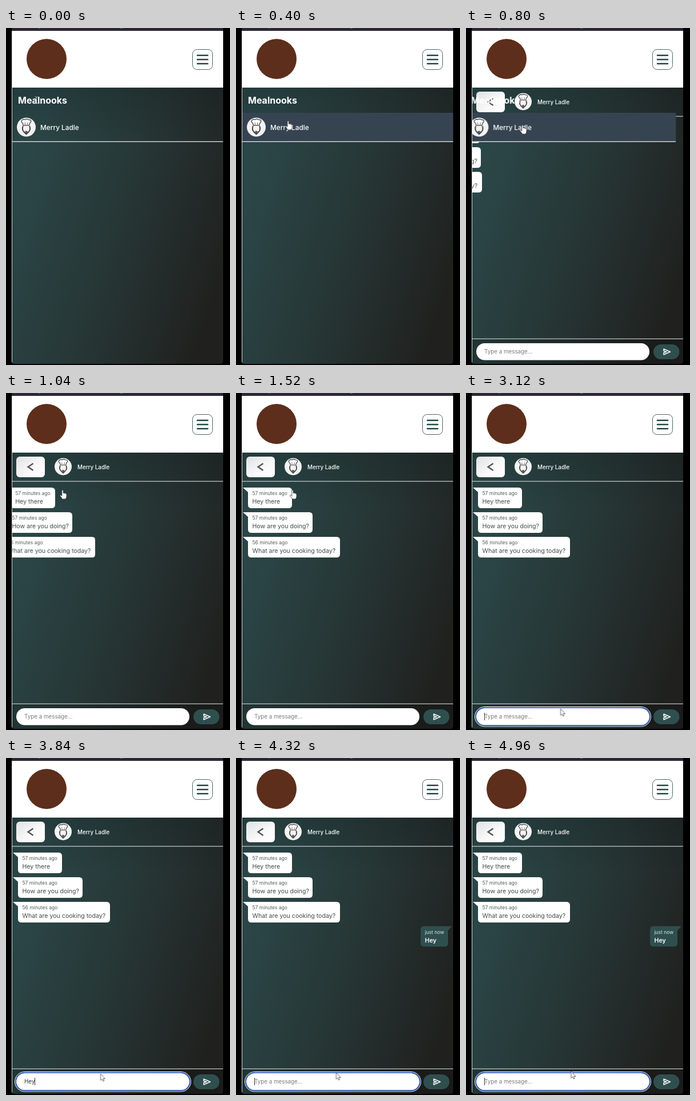
Animation of 392x588 px, one loop 5040 ms. Source, as an HTML page:

```html
<!DOCTYPE html>
<html lang="en">
<head>
<meta charset="utf-8">
<title>Chat</title>
<style>
  html, body { margin: 0; width: 100%; height: 100%; overflow: hidden; background: #000; }
  svg { display: block; width: 392px; height: 588px; font-family: Inter, "Open Sans", sans-serif; }

  .anim, .on, .bubble, .mine { animation: 5040ms linear infinite; }
  .on, .step { animation-timing-function: step-end; }

  .title { font: 700 16px Inter, sans-serif; fill: #fff; }
  .name { font-weight: 500; fill: #fff; }
  .time { font-size: 8.5px; fill: #565b5b; }
  .text { font-size: 10.6px; fill: #424a4a; }
  .field { font-size: 9.8px; }
  .bubble { animation-name: enter; fill: #fff; }
  .mine { animation-name: reply; fill: #2f4f4f; }

  .list { animation-name: leave; }
  .hover { animation-name: hover; }
  .chat { animation-name: open; }
  .ring { animation-name: focus; }
  .hint { animation-name: hint; }
  .k1 { animation-name: key1; }
  .k2 { animation-name: key2; }
  .k3 { animation-name: key3; }
  .caret { animation-name: caret; }
  .blink { animation-name: blink; }
  .old { animation-name: old; }
  .new { animation-name: new; }
  .pointer { animation-name: move; }
  .beam { animation-name: beam; }
  .arrow { animation-name: arrow; }
  .hand { animation-name: hand; }

  @keyframes leave {
    0%, 15.65% { transform: none; animation-timing-function: ease; }
    20.4%, 100% { transform: translateX(-372px); }
  }
  @keyframes enter {
    0%, 15.3% { transform: translateX(calc(var(--w) * -1px)); animation-timing-function: ease; }
    25.2%, 100% { transform: none; }
  }
  @keyframes reply {
    0%, 77.5% { transform: translateX(60px); animation-timing-function: ease; }
    87.4%, 100% { transform: none; }
  }
  @keyframes hover { 0% { opacity: 0; } 7.9%, 100% { opacity: 1; } }
  @keyframes open { 0% { opacity: 0; } 15.3%, 100% { opacity: 1; } }
  @keyframes focus { 0% { opacity: 0; } 61.9%, 100% { opacity: 1; } }
  @keyframes hint { 0% { opacity: 1; } 69.8% { opacity: 0; } 77.5%, 100% { opacity: 1; } }
  @keyframes key1 { 0% { opacity: 0; } 69.8% { opacity: 1; } 77.5%, 100% { opacity: 0; } }
  @keyframes key2 { 0% { opacity: 0; } 71.4% { opacity: 1; } 77.5%, 100% { opacity: 0; } }
  @keyframes key3 { 0% { opacity: 0; } 74.6% { opacity: 1; } 77.5%, 100% { opacity: 0; } }
  @keyframes caret {
    0% { transform: none; }
    69.8% { transform: translateX(7.3px); }
    71.4% { transform: translateX(13px); }
    74.6% { transform: translateX(18px); }
    77.5%, 100% { transform: none; }
  }
  @keyframes blink {
    0% { opacity: 0; }
    61.9% { opacity: 1; }
    87.4% { opacity: 0; }
    97.4%, 100% { opacity: 1; }
  }
  @keyframes old { 0% { opacity: 1; } 77.5%, 100% { opacity: 0; } }
  @keyframes new { 0% { opacity: 0; } 77.5%, 100% { opacity: 1; } }
  @keyframes move {
    0%, 1.6% { transform: translate(53px, 126px); animation-timing-function: ease-in-out; }
    10.5%, 33.4% { transform: translate(99px, 169px); animation-timing-function: ease-in-out; }
    44.4%, 47.7% { transform: translate(66px, 177px); animation-timing-function: ease-in-out; }
    59%, 78% { transform: translate(165.5px, 551px); animation-timing-function: ease-in-out; }
    93%, 100% { transform: translate(184px, 547px); }
  }
  @keyframes beam { 0% { opacity: 1; } 4.7%, 100% { opacity: 0; } }
  @keyframes arrow {
    0% { opacity: 0; }
    4.7% { opacity: 1; }
    7.9% { opacity: 0; }
    34.9%, 100% { opacity: 1; }
  }
  @keyframes hand { 0% { opacity: 0; } 7.9% { opacity: 1; } 34.9%, 100% { opacity: 0; } }
</style>
</head>
<body>
<svg viewBox="0 0 392 588">
  <defs>
    <linearGradient id="teal" gradientUnits="userSpaceOnUse" x1="30" y1="260" x2="392" y2="375">
      <stop offset="0" stop-color="#2b4647"/>
      <stop offset=".5" stop-color="#263635"/>
      <stop offset="1" stop-color="#20211f"/>
    </linearGradient>
    <linearGradient id="shade" x2="0" y2="1">
      <stop offset="0" stop-opacity=".16"/>
      <stop offset="1" stop-opacity="0"/>
    </linearGradient>
    <linearGradient id="shine" x2="1" y2="1">
      <stop offset="0" stop-color="#dfe1e3"/>
      <stop offset=".6" stop-color="#fafafa"/>
      <stop offset="1" stop-color="#fff"/>
    </linearGradient>
    <clipPath id="screen"><path d="M10 5H380V581Q380 586 375 586H15Q10 586 10 581Z"/></clipPath>
    <clipPath id="inner"><rect x="11" y="104" width="369" height="482"/></clipPath>
    <symbol id="chef" viewBox="-16 -16 32 32" overflow="visible">
      <circle r="16" fill="#f3f3f3"/>
      <g fill="none" stroke="#3a3a3a" stroke-width="1.2" stroke-linejoin="round">
        <path d="M-5-3L-6-7Q-10-9-7-12Q-4-14-2-12.500Q1-15 4-12.500Q8-13 8-10Q8-8 6-7L5-3Z" fill="#fff"/>
        <path d="M-2-4L-2.500-8M2-4L2.500-8" stroke-width=".8"/>
        <path d="M-5.500-2Q-8 4-4 8L0 12L4 8Q8 4 5.500-2" stroke-width="1.800"/>
      </g>
      <path d="M-2.500 7Q0 5.500 2.500 7L0 12Z" fill="#555"/>
    </symbol>
  </defs>

  <rect x="10" width="370" height="5" fill="#2b2833"/>
  <path d="M57 0l3-.2M200 0h4" stroke="#aaa"/>

  <g clip-path="url(#screen)">
    <rect x="10" y="5" width="370" height="581" fill="url(#teal)"/>
    <rect x="10" y="104" width="370" height="96" fill="url(#shade)"/>
    <rect x="10" y="5" width="370" height="99" fill="#fff"/>
    <circle cx="71" cy="54" r="35" fill="#5c2e1b"/>
    <rect x="326.500" y="37.500" width="35" height="35" rx="8" fill="#fff" stroke="#4a6661"/>
    <path d="M335 47.800H353M335 55H353M335 62.200H353" stroke="#234a44" stroke-width="2.600" stroke-linecap="round"/>

    <g clip-path="url(#inner)">
      <g class="chat on">
        <rect x="11" y="153.500" width="369" height="1.200" fill="#c8d0d0"/>
        <rect x="18" y="111" width="50" height="36" rx="6" fill="url(#shine)"/>
        <path d="M47.500 123L38.500 129L47.500 135" fill="none" stroke="#505050" stroke-width="2.300"/>
        <use href="#chef" x="85" y="113.500" width="30" height="30"/>
        <text class="name" x="125" y="132.500" font-size="9.800">Merry Ladle</text>

        <g class="bubble" style="--w:77">
          <path d="M12 165H92Q98 165 98 171V195Q98 201 92 201H27Q21 201 21 195V173Z"/>
          <text class="time" x="28.500" y="178.300">57 minutes ago</text>
          <text class="text" x="28.500" y="193.300">Hey there</text>
        </g>
        <g class="bubble" style="--w:113">
          <path d="M12 208H128Q134 208 134 214V238Q134 244 128 244H27Q21 244 21 238V216Z"/>
          <text class="time" x="28.500" y="221.300">57 minutes ago</text>
          <text class="text" x="28.500" y="236.300">How are you doing?</text>
        </g>
        <g class="bubble" style="--w:161">
          <path d="M12 251H176Q182 251 182 257V281Q182 287 176 287H27Q21 287 21 281V259Z"/>
          <text class="time old on" x="28.500" y="264.300">56 minutes ago</text>
          <text class="time new on" x="28.500" y="264.300">57 minutes ago</text>
          <text class="text" x="28.500" y="279.300">What are you cooking today?</text>
        </g>
        <g class="mine">
          <path d="M377 293.500H328Q322 293.500 322 299.500V323Q322 329 328 329H364Q370 329 370 323V301Z"/>
          <text class="time" x="329.500" y="307" style="fill:#dfe6e6">just now</text>
          <text class="text" x="329.500" y="322" style="fill:#fff;font-weight:600">Hey</text>
        </g>

        <rect x="11" y="543" width="369" height="43" fill="#000" opacity=".16"/>
        <rect x="11" y="541.800" width="369" height="1.200" fill="#c0c8c8"/>
        <rect x="18" y="550" width="303" height="29.500" rx="14.750" fill="#fff"/>
        <g class="ring on" fill="none">
          <rect x="15.500" y="547.500" width="308" height="34.500" rx="17.250" stroke="#fff"/>
          <rect x="17" y="549" width="305" height="31.500" rx="15.750" stroke="#3d66bd" stroke-width="1.800"/>
        </g>
        <text class="field hint on" x="32" y="568.300" fill="#7c7c7c">Type a message...</text>
        <g class="field" fill="#333">
          <text class="k1 on" x="32" y="568.300">H</text>
          <text class="k2 on" x="39.300" y="568.300">e</text>
          <text class="k3 on" x="45" y="568.300">y</text>
        </g>
        <g class="caret anim step"><rect class="blink on" x="32" y="558" width="1" height="13" fill="#333"/></g>
        <rect x="328" y="552" width="45.500" height="26" rx="13" fill="#2f4f4f"/>
        <path d="M346 560L357.500 565L346 570V566.500L351 565L346 563.500Z" fill="none" stroke="#fff" stroke-width="1.400" stroke-linejoin="round"/>
      </g>

      <g class="list anim">
        <text class="title" x="21" y="131.500">Mealnooks</text>
        <rect class="hover on" x="11" y="148" width="369" height="50" fill="#364452"/>
        <rect x="11" y="197.700" width="369" height="1.200" fill="#f2f4f4"/>
        <use href="#chef" x="19" y="156.500" width="33" height="33"/>
        <text class="name" x="60" y="177.500" font-size="11.800">Merry Ladle</text>
      </g>
    </g>
    <rect x="10" y="5" width="1" height="581" fill="#d5dada"/>
  </g>

  <g class="pointer anim">
    <path class="beam on" d="M-2.500-6Q0-6 0-4.500Q0-6 2.500-6M0-4.500V4.500M-2.500 6Q0 6 0 4.500Q0 6 2.500 6" fill="none" stroke="#c4cccc"/>
    <path class="arrow on" d="M0 0V11.500L2.600 9.200L4.300 13L6.200 12.200L4.500 8.500H8Z" fill="#fff" stroke="#555" stroke-width=".9" stroke-linejoin="round"/>
    <path class="hand on" d="M-1.200 1Q0-.8 1.200 1V5.500Q2.500 4.600 3.300 6Q4.600 5.200 5.300 6.600Q7 6.200 7 8V11.500Q6.600 14 5.400 16H-.6Q-1.600 13.600-4.200 10.800Q-5 9-3.300 9L-1.200 10.600Z" fill="#fff" stroke="#333" stroke-width=".8" stroke-linejoin="round"/>
  </g>
</svg>
</body>
</html>
```
